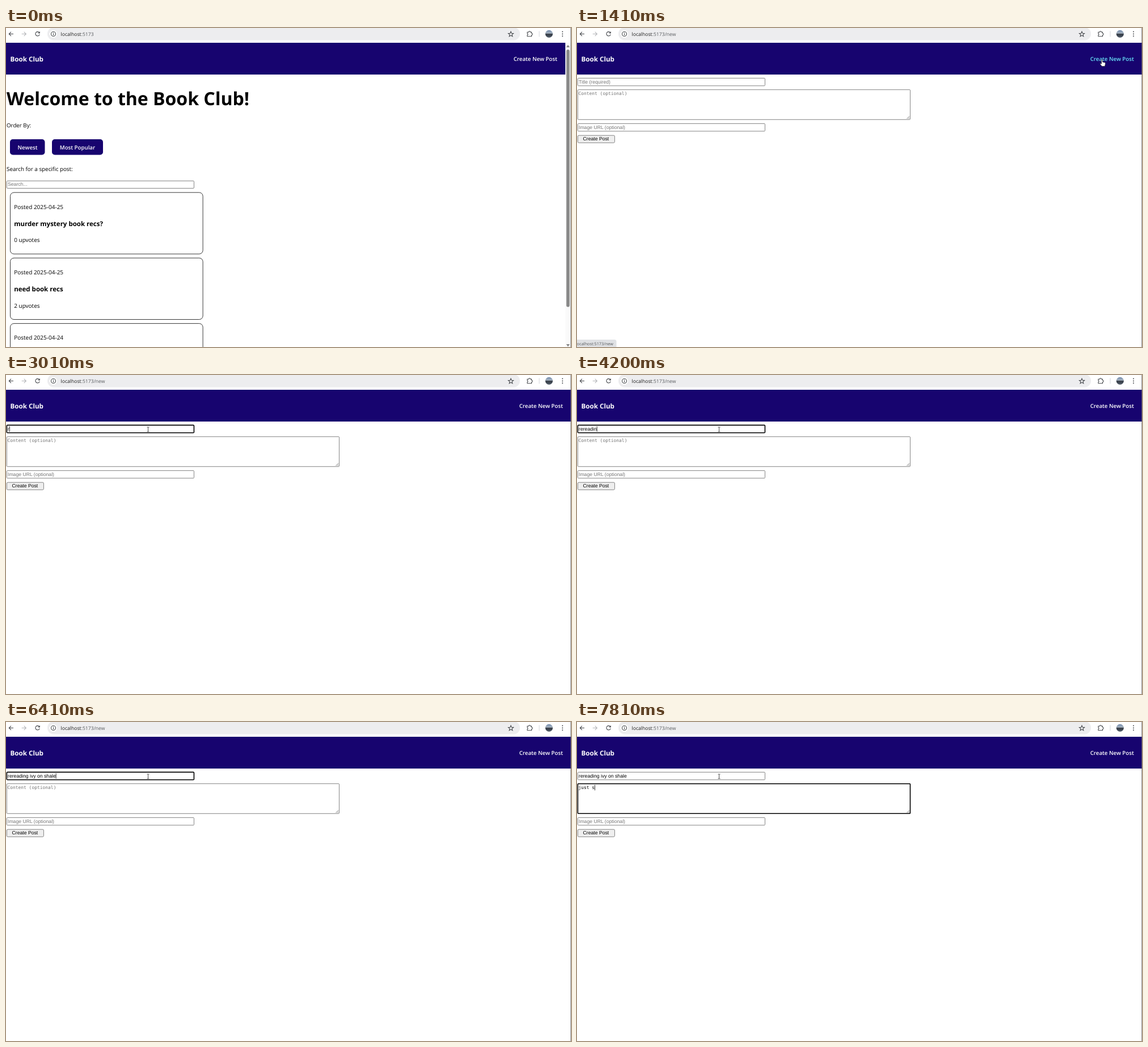
These frames come from a looping animation (996x562 px, 8000 ms). An HTML page:

```html
<!DOCTYPE html>
<html lang="en">
<head>
<meta charset="utf-8">
<title>Book Club</title>
<style>
  html, body { margin: 0; width: 100%; height: 100%; overflow: hidden; background: #fff; }
  svg { display: block; width: 996px; height: 562px; }
  text { font: 10px "Open Sans", "Noto Sans", sans-serif; white-space: pre; text-rendering: geometricPrecision; }
  .semi { font-size: 9.7px; font-weight: 600; fill: #fff; }
  .brand { font-size: 11.65px; font-weight: 700; fill: #fff; }
  .h1 { font-size: 32px; font-weight: 700; }
  .h3 { font-size: 11.5px; font-weight: 700; }
  .url { font-size: 8.65px; fill: #1f1f1f; }
  .url tspan { fill: #5a5d61; }
  .status { font-size: 7.3px; fill: #55585c; }
  .ui { font: 8.67px "Liberation Sans", Arial, sans-serif; }
  .mono { font: 7.95px "DejaVu Sans Mono", "Noto Sans Mono", monospace; }
  .hint { fill: #757575; }
  .navy { fill: #17046f; }
  .box { fill: #fff; stroke: #767676; stroke-width: .9; }
  .focus { stroke: #000; stroke-width: 1.6; }
  .card { fill: #fff; stroke: #222; stroke-width: .9; }
  .icon { fill: none; stroke: #45484c; stroke-width: 1.1; }
</style>
</head>
<body>
<svg viewBox="0 0 996 562">
  <defs>
    <linearGradient id="photo" x2="0" y2="1">
      <stop offset="0" stop-color="#6f87a8"/>
      <stop offset=".4" stop-color="#a9b6c4"/>
      <stop offset=".55" stop-color="#2f3640"/>
      <stop offset="1" stop-color="#56616e"/>
    </linearGradient>
  </defs>
  <rect width="996" height="562" fill="#fff"/>

  <g id="toolbar">
    <rect x="73" y="-1" width="833" height="22.5" rx="11" fill="#ededef"/>
    <path class="icon" d="M13 10.5H5.3M9 6.8L5.3 10.5L9 14.2"/>
    <path class="icon" style="stroke:#b4b6b9" d="M27.7 10.5H35.4M31.7 6.8L35.4 10.5L31.7 14.2"/>
    <path class="icon" d="M58.7 8.2A3.7 3.7 0 1 0 59.2 11.3M59.3 6.4V9H56.7"/>
    <circle cx="83.5" cy="10.5" r="6.6" fill="#fff"/>
    <circle class="icon" cx="83.5" cy="10.5" r="4"/>
    <path class="icon" d="M83.5 9.8V12.7M83.5 8.1V9.1"/>
    <text class="url" x="96.5" y="13.7">localhost<tspan id="path"></tspan></text>
    <path id="star" class="icon"/>
    <path class="icon" d="M919 7.3H921.4A1.5 1.5 0 0 1 924.4 7.3H926.5V9.3A1.6 1.6 0 0 1 926.5 12.5V14.8H919V12.3A1.4 1.4 0 0 0 919 9.6Z"/>
    <path d="M940 5.5V15.5" stroke="#d3d6da"/>
    <circle cx="957.3" cy="10.3" r="6.6" fill="url(#photo)"/>
    <g fill="#45484c"><circle cx="981" cy="6.6" r="1"/><circle cx="981" cy="10.4" r="1"/><circle cx="981" cy="14.2" r="1"/></g>
  </g>

  <rect class="navy" y="26" width="996" height="56"/>
  <text class="brand" x="7.5" y="59">Book Club</text>
  <text id="link" class="semi" y="58">Create New Post</text>

  <g id="home">
    <text class="h1" x="1" y="136">Welcome to the Book Club!</text>
    <text style="font-size:9.75px" x="1" y="175">Order By:</text>
    <rect class="navy" x="7" y="196" width="61.5" height="27.5" rx="5"/>
    <text class="semi" x="20.5" y="214">Newest</text>
    <rect class="navy" x="81" y="196" width="90" height="27.5" rx="5"/>
    <text class="semi" x="94.7" y="214">Most Popular</text>
    <text style="font-size:9.85px" x="1" y="252">Search for a specific post:</text>
    <rect class="box" x="1.4" y="269.4" width="330" height="13" rx="1.3"/>
    <text class="ui hint" x="3" y="278.3">Search...</text>
    <g id="cards"></g>
    <rect x="986" y="26" width="10" height="536" fill="#fafafa"/>
    <rect x="987.8" y="38" width="5.8" height="453.5" rx="2.9" fill="#8a8a8a"/>
    <path d="M987.6 34L990.7 29.8L993.8 34ZM987.6 557L990.7 561.2L993.8 557Z" fill="#858585"/>
  </g>

  <g id="form">
    <rect id="titleBox" class="box" x="1.4" y="88.4" width="330" height="13.4" rx="1.3"/>
    <text id="title" class="ui" x="3" y="98"></text>
    <rect id="bodyBox" class="box" x="1.4" y="108.7" width="586" height="52.6" rx="1"/>
    <path d="M581.5 160L586 155.5M584.3 160L586 158.3" stroke="#555" stroke-width=".8"/>
    <text id="body" class="mono" x="2.4" y="118.4"></text>
    <rect class="box" x="1.4" y="168.4" width="330" height="13.4" rx="1.3"/>
    <text class="ui hint" x="3" y="178">Image URL (optional)</text>
    <rect class="box" style="fill:#efefef" x="1.4" y="189.2" width="65" height="13" rx="1.8"/>
    <text class="ui" x="10.5" y="198.3">Create Post</text>
    <rect id="caret" width=".8" height="9.6"/>
    <g id="status">
      <path d="M0 549H66Q69.5 549 69.5 552.5V562H0Z" fill="#dfe1e4"/>
      <text class="status" x="-2" y="559.3">localhost:5173/new</text>
    </g>
  </g>

  <path d="M995.6 0V562" stroke="#666a70" stroke-width=".8"/>

  <circle id="press" cx="924.3" cy="56" r="7" fill="#c4b000" opacity=".62"/>
  <g id="pointer" stroke-linejoin="round">
    <path id="arrow" fill="#fff" stroke="#000" stroke-width=".8" d="M0 0V11.2L2.6 8.8L4.3 12.6L6 11.9L4.4 8.2H7.8Z"/>
    <path id="hand" fill="#fff" stroke="#222" stroke-width=".7" d="M-1 .9Q0 -.6 1 .9V4.4L4.8 5.3Q6.2 5.8 6 7.4L5 12H-.2L-3.2 8.2Q-3.6 6.8 -2.2 7L-1 7.8Z"/>
    <path id="beam" fill="none" stroke="#222" stroke-width=".8" d="M-2 -4H-.5L0 -3.5L.5 -4H2M0 -3.5V3.5M-2 4H-.5L0 3.5L.5 4H2"/>
  </g>
</svg>
<script>
const LOOP = 8000;
const $ = id => document.getElementById(id);
const show = (id, on) => $(id).setAttribute('display', on ? 'inline' : 'none');

// [time, x, y, shape]
const moves = [
  [0, 0, 0, ''],
  [200, 888.5, 435, 'arrow'], [400, 897, 300, 'arrow'], [610, 909, 165, 'arrow'],
  [810, 920, 76, 'arrow'], [1020, 924.5, 55, 'hand'], [1410, 925.5, 55.5, 'hand'],
  [1810, 800, 66, 'arrow'], [2000, 480, 70, 'arrow'], [2200, 275, 76, 'arrow'],
  [2400, 250.5, 95.8, 'beam']
];

// [time, letters typed so far]
const titleText = 'rereading ivy on shale';
const titleKeys = [
  [0, 0], [3010, 1], [3210, 2], [3410, 3], [3610, 4], [3810, 5], [4010, 6],
  [4200, 8], [4400, 9], [4610, 10], [4810, 12], [5020, 14], [5220, 15],
  [5410, 16], [5610, 18], [5820, 19], [6020, 21], [6410, 22]
];
const bodyText = 'just s';
const bodyKeys = [[0, 0], [7020, 1], [7220, 2], [7420, 4], [7610, 5], [7810, 6]];
const statusFade = [[0, 1], [2000, .5], [2200, 0]];

const at = (steps, t) => steps.findLast(s => s[0] <= t);

function addCard(i, date, title, votes) {
  const y = i * 115.4;
  $('cards').insertAdjacentHTML('beforeend', `<g transform="translate(0 ${y})">
    <rect class="card" x="7.5" y="289.8" width="339.6" height="108.3" rx="6.5"/>
    <text x="14.2" y="318.7">Posted ${date}</text>
    <text class="h3" x="14.2" y="348.7">${title}</text>
    <text x="14.2" y="377.2">${votes} upvotes</text></g>`);
}
addCard(0, '2025-04-25', 'murder mystery book recs?', 0);
addCard(1, '2025-04-25', 'need book recs', 2);
addCard(2, '2025-04-24', '', 0);

$('star').setAttribute('d', 'M' + Array.from({ length: 10 }, (_, i) => {
  const r = i % 2 ? 2.1 : 4.8, a = i * Math.PI / 5;
  return `${890 + r * Math.sin(a)} ${11 - r * Math.cos(a)}`;
}).join('L') + 'Z');

function setField(id, text, hint) {
  $(id).textContent = text || hint;
  $(id).classList.toggle('hint', !text);
}

function placeCaret(id, text, top) {
  const x = +$(id).getAttribute('x') + (text ? $(id).getComputedTextLength() : 0);
  $('caret').setAttribute('x', x);
  $('caret').setAttribute('y', top);
}

function draw(t) {
  const onForm = t >= 1410;
  const focus = t < 2610 ? '' : t < 6610 ? 'title' : 'body';
  const [, x, y, shape] = at(moves, t);

  show('home', !onForm);
  show('form', onForm);
  $('path').textContent = onForm ? ':5173/new' : ':5173';
  $('link').setAttribute('x', onForm ? 904.7 : 894.7);
  $('link').style.fill = shape === 'hand' ? '#68e4fa' : '#fff';
  $('status').setAttribute('opacity', at(statusFade, t)[1]);

  const title = titleText.slice(0, at(titleKeys, t)[1]);
  const body = bodyText.slice(0, at(bodyKeys, t)[1]);
  setField('title', title, 'Title (required)');
  setField('body', body, 'Content (optional)');
  for (const id of ['title', 'body']) $(id + 'Box').classList.toggle('focus', focus === id);
  show('caret', focus);
  if (focus === 'title') placeCaret('title', title, 90.4);
  if (focus === 'body') placeCaret('body', body, 110.8);

  show('press', t >= 1220 && t < 1410);
  for (const id of ['arrow', 'hand', 'beam']) show(id, id === shape);
  $('pointer').setAttribute('transform', `translate(${x} ${y})`);
}

const start = performance.now();
function tick() {
  draw((performance.now() - start) % LOOP);
  requestAnimationFrame(tick);
}
tick();
</script>
</body>
</html>
```
